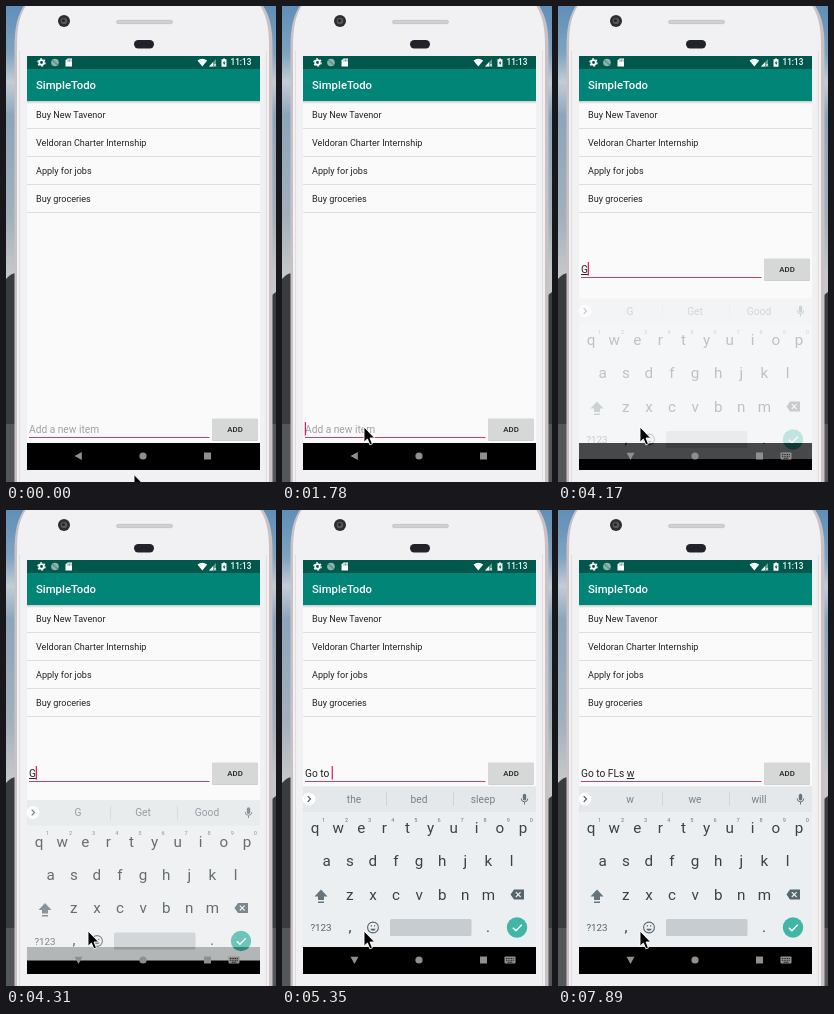
An HTML page that plays this animation: 270x476 px, repeating every 8000 ms.

```html
<!DOCTYPE html>
<html lang="en">
<head>
<meta charset="utf-8">
<title>Todo list</title>
<style>
html, body { margin: 0; width: 100%; height: 100%; overflow: hidden; background: #8398a6; }
svg { display: block; width: 100vw; height: 100vh; font-family: Roboto, "Open Sans", sans-serif; }
.mid { text-anchor: middle; }
.medium { font-weight: 500; }
.row { font-size: 9.07px; fill: #222; }
.key { font-size: 15.2px; fill: #37434a; }
.digit { font-size: 5.6px; fill: #6c787e; }
.hint { font-size: 10.2px; }
.word { font-size: 10.2px; fill: #75828a; }
#word { text-decoration: underline; text-decoration-thickness: .7px; }
</style>
</head>
<body>
<svg viewBox="0 0 270 476" preserveAspectRatio="none">
  <defs>
    <linearGradient id="sky" x2="0" y2="1">
      <stop offset="0" stop-color="#5f8fb8"/>
      <stop offset=".1" stop-color="#7fa3c0"/>
      <stop offset=".16" stop-color="#c3cdd5"/>
      <stop offset=".23" stop-color="#8ba6ba"/>
      <stop offset=".45" stop-color="#a3b1bb"/>
      <stop offset=".56" stop-color="#c4c7c9"/>
    </linearGradient>
    <linearGradient id="shade" x2="0" y2="1">
      <stop offset="0" stop-opacity=".2"/>
      <stop offset="1" stop-opacity="0"/>
    </linearGradient>
  </defs>

  <!-- Wallpaper -->
  <rect width="270" height="476" fill="url(#sky)"/>
  <path d="M0 273Q5 267 10 267V476H0zM262 292L270 286V476H262z" fill="#393d40"/>
  <path d="M0 418H10V476H0zM262 418H270V476H262z" fill="#54575a"/>

  <!-- Phone -->
  <path d="M19 -2C12 8 8.500 20 8.500 40V480H266.500V40C266.500 20 263 8 256 -2z" fill="#cbc1c5"/>
  <path d="M21 -2C14 8 11 20 11 40V480H263V40C263 20 260 8 253 -2z" fill="#f1f0f2"/>
  <path d="M13.500 45V476M260.500 45V476" stroke="#e1dde0"/>
  <circle cx="58" cy="15" r="6" fill="#2d2d30"/>
  <circle cx="58" cy="15" r="3.300" fill="#55565b"/>
  <circle cx="57.500" cy="14.500" r="1.500" fill="#222328"/>
  <rect x="110.500" y="14.300" width="56" height="3.400" rx="1.700" fill="#d0d0d3" stroke="#b9b9bd" stroke-width=".6"/>
  <rect x="128" y="34" width="20" height="8.500" rx="4.200" fill="#22232a"/>

  <!-- Screen -->
  <rect x="21" y="50" width="233" height="414" fill="#fafafa"/>
  <rect x="21" y="95" width="233" height="3" fill="url(#shade)"/>
  <rect x="21" y="50" width="233" height="13" fill="#00574b"/>
  <rect x="21" y="63" width="233" height="32" fill="#008577"/>
  <g fill="#fff">
    <circle cx="35.500" cy="56.500" r="2.300" fill="none" stroke="#fff" stroke-width="1.700"/>
    <circle cx="35.500" cy="56.500" r="3.600" fill="none" stroke="#fff" stroke-width="1.300" stroke-dasharray="1.900 1.870"/>
    <circle cx="49" cy="56.500" r="3.800" fill="#8db3ac"/>
    <path d="M46.500 54L51.500 59" stroke="#5f8f87" stroke-width="1.300"/>
    <path d="M61.500 52.500H66V60.500H59.500V54.500z"/>
    <path d="M62 53.500V55.500M63.500 53.500V55.500M65 53.500V55.500" stroke="#00574b" stroke-width=".6"/>
    <path d="M191.500 54.500Q196.300 51 201.200 54.500L196.300 60.500z"/>
    <path d="M210 53V60.500H203z" opacity=".4"/>
    <path d="M207 56.200V60.500H203z"/>
    <path d="M207.800 58L210 60.500M210 58L207.800 60.500" stroke="#fff" stroke-width=".7"/>
    <path d="M215.500 53.300H217V52.500H219V53.300H220.500V60.800H215.500z"/>
    <path d="M218.400 54.500L216.700 57.400H217.900V59.600L219.500 56.600H218.400z" fill="#00574b"/>
    <text class="medium" x="224.500" y="59.200" font-size="8.200">11:13</text>
    <text class="medium" x="30" y="83.200" font-size="11.340">SimpleTodo</text>
  </g>
  <g id="rows"></g>

  <!-- Entry field -->
  <g id="entry">
    <text class="hint" id="hint" x="23" y="427" fill="#a0a0a0">Add a new item</text>
    <text class="hint" id="typed" x="23" y="427" fill="#222"><tspan id="done"></tspan><tspan id="word"></tspan></text>
    <rect x="23" y="431" width="180.500" height="1" fill="#c0446e"/>
    <rect id="caret" y="416" width="1.200" height="13.500" fill="#d81b60"/>
    <rect x="206" y="413.400" width="46" height="21.500" rx="1.200" fill="#bdbdbd" opacity=".7"/>
    <rect x="206" y="412.500" width="46" height="21.500" rx="1.200" fill="#d6d7d7"/>
    <text class="medium mid" x="229" y="426" font-size="7.900" fill="#222">ADD</text>
  </g>

  <rect x="21" y="437" width="233" height="27" fill="#000"/>

  <!-- Keyboard -->
  <g id="board">
    <rect x="21" y="276.500" width="233" height="160.500" fill="#eceff1"/>
    <rect x="21" y="276.500" width="233" height="25.500" fill="#e4e8ea"/>
    <circle cx="27" cy="289" r="6.500" fill="#fff"/>
    <path d="M25.700 286.200L28.500 289L25.700 291.800" fill="none" stroke="#455a64" stroke-width="1.200"/>
    <path d="M104.500 282V296M171.500 282V296" stroke="#cfd5d8"/>
    <g id="words"></g>
    <rect x="240.800" y="283.800" width="3.400" height="6.600" rx="1.700" fill="#66757d"/>
    <path d="M239.200 288.500A3.300 3.300 0 0 0 245.800 288.500M242.500 292V294.500" fill="none" stroke="#66757d"/>
    <g id="keys"></g>
    <path d="M39 379.500L45.500 386.500H42V390H36V386.500H32.500zM36 391.500H42V393H36z" fill="#66757d"/>
    <path d="M228.500 384.500L232 379.500H242V389.500H232z" fill="#56656d"/>
    <path d="M233.800 382.200L238.600 387M238.600 382.200L233.800 387" stroke="#eceff1" stroke-width="1.200"/>
    <text class="mid" x="39" y="421.300" font-size="9.800" fill="#56646b">?123</text>
    <circle cx="91" cy="417.500" r="5.400" fill="none" stroke="#56656d" stroke-width="1.100"/>
    <path d="M88.300 418.800A2.800 2.800 0 0 0 93.700 418.800z" fill="#56656d"/>
    <path d="M88.800 415.800H90M92 415.800H93.200" stroke="#56656d" stroke-width="1.300"/>
    <rect x="108" y="409" width="81.500" height="17" rx="1.500" fill="#c6cccf"/>
    <circle cx="235" cy="417.500" r="10.200" fill="#41b5a6"/>
    <path d="M230.800 417.700L233.900 420.800L239.800 414.800" fill="none" stroke="#fff" stroke-width="1.400"/>
  </g>

  <!-- Navigation bar -->
  <g fill="#8f8f8f">
    <path id="back" d="M68.500 450L75.800 446V454z"/>
    <circle cx="137" cy="450" r="3.600"/>
    <rect x="198" y="446.500" width="7" height="7"/>
    <g id="switcher">
      <rect x="222.500" y="446.500" width="11" height="7" rx=".8"/>
      <path d="M224 448.500H232M224 450.300H232" stroke="#000" stroke-width=".8" stroke-dasharray="1 .7"/>
      <path d="M225.500 452.200H230.500" stroke="#000" stroke-width=".7"/>
    </g>
  </g>

  <path id="pointer" d="M0 0V15.200L3.400 12L5.900 17.900L8.400 16.800L6 11H10.700z" fill="#000" stroke="#fff" stroke-width=".9"/>
</svg>
<script>
const LOOP = 8000;
const $ = id => document.getElementById(id);

function add(parent, tag, attrs, text = "") {
  const node = document.createElementNS("http://www.w3.org/2000/svg", tag);
  for (const name in attrs) node.setAttribute(name, attrs[name]);
  node.textContent = text;
  return $(parent).appendChild(node);
}

["Buy New Tavenor", "Veldoran Charter Internship", "Apply for jobs", "Buy groceries"].forEach((item, i) => {
  const y = 112 + i * 28;
  add("rows", "text", { class: "row", x: 30, y }, item);
  add("rows", "rect", { x: 21, y: y + 10, width: 233, height: 1, fill: "#dedede" });
});

// Letter rows: letters, first centre, baseline
[["qwertyuiop", 33, 323], ["asdfghjkl", 44.700, 356], ["zxcvbnm", 67.800, 389.500], [",", 68, 421.500], [".", 206, 421.500]]
  .forEach(([letters, left, y], row) => [...letters].forEach((letter, i) => {
    const x = left + i * 23.100;
    add("keys", "text", { class: "key mid", x, y }, letter);
    if (!row) add("keys", "text", { class: "digit mid", x: x + 8.500, y: 311.500 }, (i + 1) % 10);
  }));

const words = [72, 137, 201].map(x => add("words", "text", { class: "word mid", x, y: 292.700 }));

// Time, finished text, word in progress, suggestions
const typing = [
  [0, "", "", ""],
  [4170, "", "G", "G,Get,Good"],
  [4610, "", "Go", "G,Get,Good"],
  [4760, "", "Go", "Go,Good,Going"],
  [4910, "Go ", "", "to,for,ahead"],
  [5200, "Go ", "to", "to,too,tonight"],
  [5350, "Go to ", "", "the,bed,sleep"],
  [5800, "Go to ", "F", "F,For,From"],
  [5950, "Go to ", "FL", "FL,Fly,Float"],
  [6240, "Go to ", "FLs", "FLs,Jail,Fls"],
  [6990, "Go to FLs ", "", "and,for,to"],
  [7440, "Go to FLs ", "w", "w,we,will"]
];

// Times at which the caret switches, starting hidden
const blinks = [600, 1040, 1640, 2080, 2530, 2970, 3570, 4020, 4170, 6840, 6990, 7890];

// Time, keyboard drop, keyboard opacity
const slide = [[0, 0, 0], [4170, 16, .3], [4310, 13.500, .76], [4460, 0, 1]];

// Time, pointer tip
const moves = [
  [0, 128, 468.500], [150, 131, 469], [300, 135, 470], [450, 138, 471], [600, 137, 472],
  [750, 133, 472], [890, 127, 471], [1040, 121, 470.500], [1190, 109, 439],
  [1340, 98, 430], [1490, 90, 424], [1640, 84, 421.500], [1780, 82, 421]
];

const at = (list, t) => list.findLast(entry => entry[0] <= t);

function draw(now) {
  const t = now % LOOP;
  const open = t >= 4170;
  const [, done, word, list] = at(typing, t);
  const [, drop, alpha] = at(slide, t);
  const [, x, y] = at(moves, t);

  $("done").textContent = done.replaceAll(" ", "\u00a0");
  $("word").textContent = word;
  $("hint").setAttribute("visibility", done + word ? "hidden" : "visible");
  $("caret").setAttribute("x", 22.800 + (done + word ? $("typed").getComputedTextLength() : 0));
  $("caret").setAttribute("opacity", blinks.filter(b => b <= t).length % 2);
  list.split(",").forEach((text, i) => words[i].textContent = text);
  if (!list) words.forEach(node => node.textContent = "");

  $("entry").setAttribute("transform", `translate(0 ${open ? -160 : 0})`);
  $("board").setAttribute("transform", `translate(0 ${drop})`);
  $("board").setAttribute("opacity", alpha);
  $("back").setAttribute("transform", open ? "rotate(-90 72.500 450)" : "");
  $("switcher").setAttribute("opacity", open ? 1 : 0);
  $("pointer").setAttribute("transform", `translate(${x} ${y})`);
}

function tick() {
  draw(performance.now());
  requestAnimationFrame(tick);
}
tick();
</script>
</body>
</html>
```
